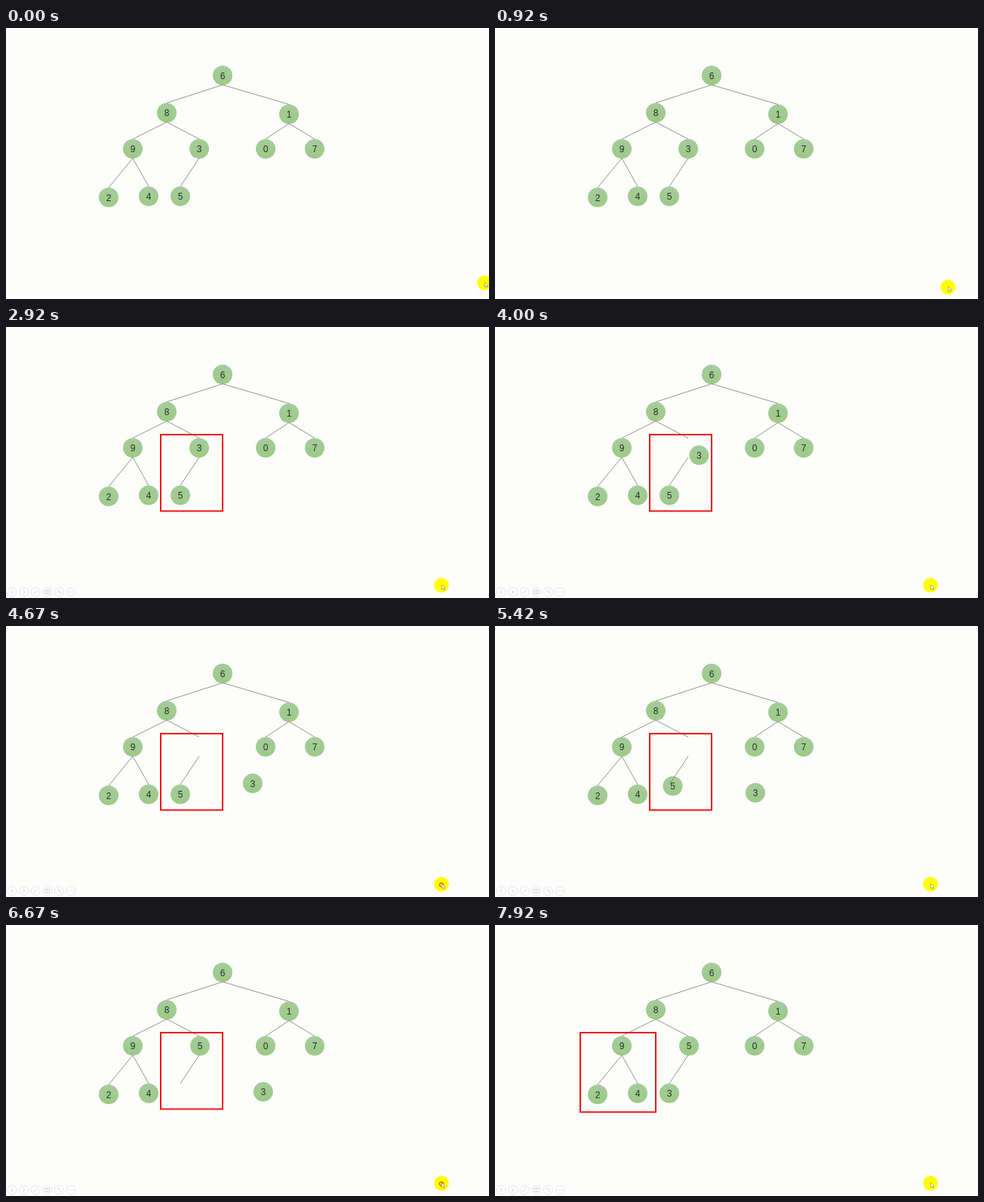
These frames come from a looping animation (640x360 px, 8 s). An HTML page:

```html
<!DOCTYPE html>
<html lang="en">
<head>
<meta charset="utf-8">
<title>Heap sift-down</title>
<style>
  html, body { margin: 0; width: 100%; height: 100%; overflow: hidden; background: #fdfdfc; }
  svg { display: block; width: 100vw; height: 100vh; }
  text { font: 12px "Liberation Sans", Arial, sans-serif; fill: #26302a; text-anchor: middle; }
</style>
</head>
<body>
<svg id="stage" viewBox="0 0 640 360">
  <defs>
    <linearGradient id="leaf" x1="0" y1="0" x2="0" y2="1">
      <stop offset="0" stop-color="#a5cc9b"/>
      <stop offset="1" stop-color="#9dca86"/>
    </linearGradient>
  </defs>
  <rect width="640" height="360" fill="#fdfdfc"/>
  <g id="nodes"></g>
  <g id="links" stroke="#858b80" stroke-width=".9"></g>
  <g fill="none" stroke="#f01414" stroke-width="2">
    <rect id="boxRight" x="205" y="143" width="82" height="101.5"/>
    <rect id="boxLeft" x="113" y="143" width="100" height="105.5"/>
  </g>
  <g id="toolbar" fill="none" stroke="#e7e7ea" stroke-width="1"></g>
  <g id="pointer">
    <circle r="9.8" fill="#ffff00"/>
    <circle id="press" cy=".8" r="2.5" fill="none" stroke="#e8481c" stroke-width="1.2"/>
    <path d="M.5 -.5V5.5L1.9 4.3 3 6.5 4 6 3 3.9H4.9Z" fill="#fff" stroke="#84845c" stroke-width=".6"/>
  </g>
</svg>
<script>
const LOOP = 8000, STEP = 1000 / 12, MOVE = 1520;
const $ = id => document.getElementById(id);

function add(parent, tag, attrs, text) {
  const el = document.createElementNS("http://www.w3.org/2000/svg", tag);
  for (const name in attrs) el.setAttribute(name, attrs[name]);
  if (text !== undefined) el.textContent = text;
  parent.appendChild(el);
  return el;
}

const place = (el, [x, y]) => el.setAttribute("transform", `translate(${x} ${y})`);
const clamp = v => Math.min(1, Math.max(0, v));
const ramp = (t, from, to) => clamp((t - from) / (to - from));
const ease = (t, start) => .5 - .5 * Math.cos(Math.PI * ramp(t, start, start + MOVE));
const mix = (a, b, f) => a.map((v, i) => v + (b[i] - v) * f);

// Tree
const home = {
  6: [287, 63], 8: [213, 112.5], 1: [375, 114.5], 9: [168, 160.5], 0: [344, 160.5],
  7: [409, 160.5], 2: [136, 225], 4: [189, 223.5], 5: [231, 223.5], 3: [256, 160.5]
};
const node = {};
for (const key in home) {
  node[key] = add($("nodes"), "g", {});
  add(node[key], "circle", { r: 13, fill: "url(#leaf)" });
  add(node[key], "text", { y: 4.5 }, key);
  place(node[key], home[key]);
}
for (const [a, b] of ["68", "61", "89", "83", "10", "17", "92", "94", "35"]) {
  const [x1, y1] = home[a], [x2, y2] = home[b];
  add($("links"), "line", { x1, y1: y1 + 12.5, x2, y2: y2 - 13 });
}

// Slide-show controls
for (let i = 0; i < 6; i++) {
  const button = add($("toolbar"), "g", {});
  place(button, [8 + i * 15.6, 352]);
  add(button, "circle", { r: 6 });
  add(button, "path", {
    d: ["M1.5 -2.5L-1.5 0 1.5 2.5", "M-1.5 -2.5L1.5 0 -1.5 2.5", "M-3 3L3 -3",
        "M-3 -2.5H3V2.5H-3ZM0 -2.5V2.5", "M-2.5 -1A2 2 0 1 1 1 1L3 3", "M-3 0H-2M-.5 0H.5M2 0H3"][i],
    stroke: "#d6d6da"
  });
}

const parked = [345, 221.5], upper = [257, 160.5], lower = [231, 223.5];
const presses = [[2410, 2490], [3330, 3490], [4580, 4820], [6160, 6320], [6660, 6820], [7660, 7820]];

// A click completes whichever move is still running.
function positionOf3(t) {
  if (t < 4820) return mix(home[3], parked, ease(t, 3600));
  if (t < 6820) return mix(parked, lower, ease(t, 6480));
  return lower;
}
function positionOf5(t) {
  return t < 6320 ? mix(home[5], upper, ease(t, 5000)) : upper;
}
function pointerAt(t) {
  const start = [634, 338.5], middle = [616, 345], rest = [577, 343];
  return t < 750 ? mix(start, middle, ramp(t, 250, 670)) : mix(middle, rest, ramp(t, 750, 1160));
}

function draw(ms) {
  // Ten pictures a second on a twelfth-second clock: every sixth tick repeats.
  let tick = Math.floor((ms + 4) / STEP) % 96;
  if (tick % 6 === 3) tick--;
  const t = tick * STEP;
  place(node[3], positionOf3(t));
  place(node[5], positionOf5(t));
  place($("pointer"), pointerAt(t));
  $("press").setAttribute("opacity", presses.some(([on, off]) => t >= on && t < off) ? 1 : 0);
  $("toolbar").setAttribute("opacity", ramp(t, 1250, 1660));
  $("boxRight").setAttribute("opacity", ramp(t, 2335, 2580) * (1 - ramp(t, 6750, 6910)));
  $("boxLeft").setAttribute("opacity", ramp(t, 7750, 7910));
}

const began = performance.now();
function frame() {
  draw((performance.now() - began) % LOOP);
  requestAnimationFrame(frame);
}
frame();
</script>
</body>
</html>
```
